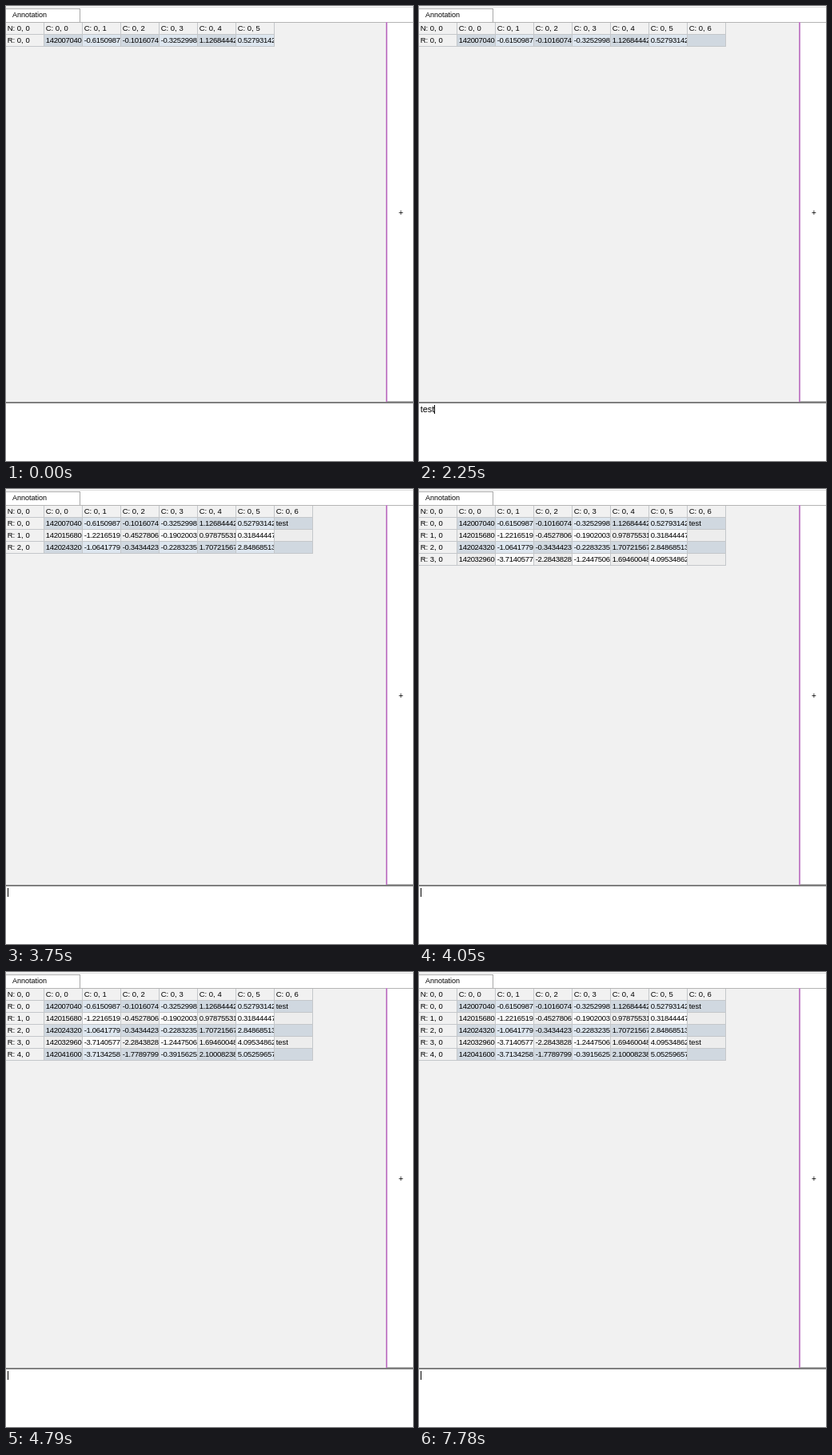
Recreate the animation shown at these times as an HTML page. Size 509 px wide and 569 px high, loop 8 s.

```html
<!DOCTYPE html>
<html lang="en">
<head>
<meta charset="utf-8">
<title>Annotation table</title>
<style>
html, body { margin: 0; width: 100%; height: 100%; overflow: hidden; background: #fff; }
body { position: relative; color: #000; font-family: "Liberation Sans", Arial, sans-serif; }
div, pre { position: absolute; box-sizing: border-box; margin: 0; white-space: pre; }
#top { left: 0; top: 1px; width: 509px; height: 1px; background: #dcdcdc; }
#tab { left: 0; top: 3px; width: 93px; height: 17px; padding-left: 8px; font-size: 9px; line-height: 15px;
  border: solid #a8a8a8; border-width: 1px 1px 0 0; }
#panel { left: 0; top: 20px; width: 475px; height: 475px; background: #f1f1f1; border-top: 1px solid #b4b4b4; }
#divider { left: 475px; top: 20px; width: 2px; height: 475px; background: #c583c9; }
#side { left: 477px; top: 20px; width: 32px; height: 475px; border: solid #b4b4b4; border-width: 1px 0; }
#plus { left: 477px; top: 252px; width: 34px; text-align: center; font-size: 10px; line-height: 13px; }
#rule { left: 0; top: 495px; width: 509px; height: 2px; background: linear-gradient(#777 50%, #888 50%); }
.cell { height: 15px; padding-left: 1.7px; overflow: hidden; font-size: 9.5px; line-height: 14px;
  border: solid #c4c7ca; border-width: 0 1px 1px 0; }
.num { letter-spacing: -.3px; }
#input { left: 1.7px; top: 499px; font: 11px/11px "Liberation Sans", Arial, sans-serif; }
#input i { display: inline-block; width: 1px; height: 11px; margin-right: -1px; vertical-align: top; background: #000; }
</style>
</head>
<body>
<div id="top"></div>
<div id="panel"></div>
<div id="tab">Annotation</div>
<div id="divider"></div>
<div id="side"></div>
<div id="plus">+</div>
<div id="rule"></div>
<div id="table"></div>
<pre id="input"></pre>
<script>
const LOOP = 8000, COL = 48, ROW = 15, TOP = 21;
const data = [
  "-0.61509871 -0.10160740 -0.32529983 1.12684442 0.52793142",
  "-1.22165191 -0.45278060 -0.19020030 0.97875531 0.31844447",
  "-1.06417791 -0.34344231 -0.22832351 1.70721567 2.84868513",
  "-3.71405770 -2.28438281 -1.24475060 1.69460048 4.09534862",
  "-3.71342581 -1.77897991 -0.39156251 2.10008238 5.05259657"
].map((line, r) => [1420070400 + 86400 * r, ...line.split(" ")]);
const shades = [["#d0d8e0", "#dde6ef"], ["#ededed", "#fafafa"]];

// time, typed text, caret shown, table rows, note column shown
const steps = [
  [0, "", 0, 1, 0], [150, "", 1, 1, 0], [600, "", 0, 1, 0],
  [900, "a", 1, 1, 0], [1350, "a\n", 1, 1, 0], [1500, "", 1, 1, 1],
  [1950, "te", 1, 1, 1], [2250, "test", 1, 1, 1], [2700, "", 1, 2, 1],
  [3300, "", 0, 2, 1], [3750, "", 1, 3, 1], [3900, "\n", 1, 3, 1],
  [4050, "", 1, 4, 1], [4200, "t", 1, 4, 1], [4340, "te", 1, 4, 1],
  [4490, "test", 1, 4, 1], [4790, "", 1, 5, 1], [5390, "", 0, 5, 1],
  [5840, "", 1, 5, 1], [6290, "", 0, 5, 1], [6880, "", 1, 5, 1],
  [7330, "", 0, 5, 1], [7780, "", 1, 5, 1]
];

const table = document.getElementById("table");
const input = document.getElementById("input");
const caret = document.createElement("i");

function addCell(col, row, text, color, numeric) {
  const cell = document.createElement("div");
  cell.className = numeric ? "cell num" : "cell";
  cell.textContent = text;
  Object.assign(cell.style, {
    left: col * COL + "px", top: TOP + row * ROW + "px",
    width: COL + "px", background: color
  });
  table.append(cell);
}

function drawTable(rows, notes) {
  table.textContent = "";
  const cols = notes ? 7 : 6;
  addCell(0, 0, "N: 0, 0", "#f1f1f1");
  for (let c = 0; c < cols; c++) addCell(c + 1, 0, `C: 0, ${c}`, "#f1f1f1");
  for (let r = 0; r < rows; r++) {
    addCell(0, r + 1, `R: ${r}, 0`, "#f1f1f1");
    for (let c = 0; c < cols; c++) {
      const note = r % 3 === 0 && r < rows - 1 ? "test" : "";
      addCell(c + 1, r + 1, c < 6 ? data[r][c] : note, shades[r % 2][c % 2], c < 6);
    }
  }
}

let current;
function frame() {
  const t = performance.now() % LOOP;
  const step = steps.findLast(s => s[0] <= t);
  if (step !== current) {
    current = step;
    const [, text, shown, rows, notes] = step;
    drawTable(rows, notes);
    input.textContent = text;
    if (shown) input.append(caret);
  }
  requestAnimationFrame(frame);
}
frame();
</script>
</body>
</html>
```
